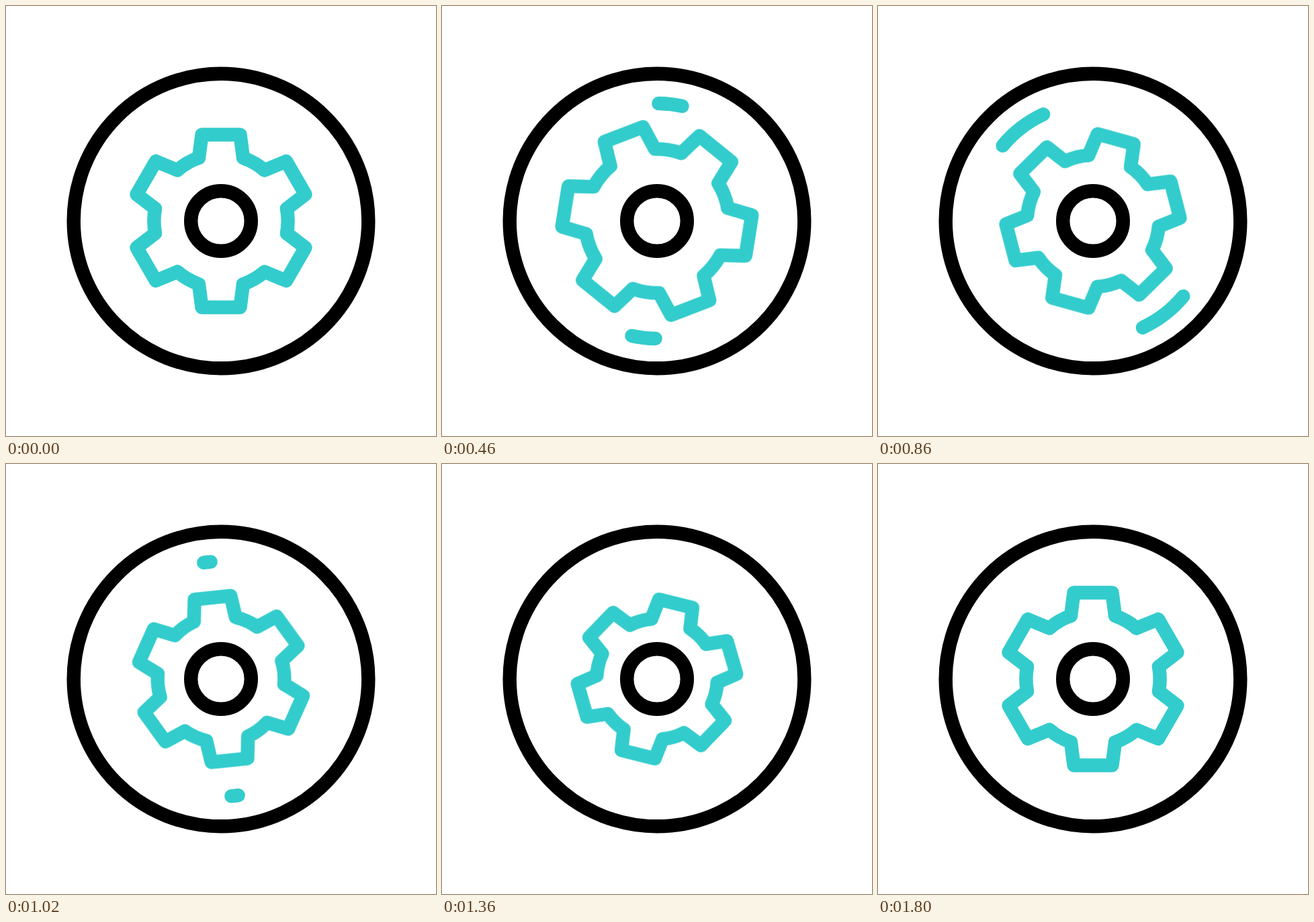
These frames come from a looping animation (640x640 px, 2420 ms). An HTML page without scripts:

```html
<!DOCTYPE html>
<html lang="en">
<head>
<meta charset="utf-8">
<title>Turning gear</title>
<style>
  @property --size { syntax: "<number>"; inherits: true; initial-value: 1; }
  @property --head { syntax: "<length>"; inherits: true; initial-value: 0px; }
  @property --tail { syntax: "<length>"; inherits: true; initial-value: 0px; }

  html, body { margin: 0; width: 100%; height: 100%; overflow: hidden; background: #fff; }
  svg { display: block; width: 100%; height: 100%; }

  .line { fill: none; stroke-width: 20.4px; stroke-linecap: round; stroke-linejoin: round; }
  .dark { stroke: #000; }
  .teal { stroke: #33cccc; }

  .gear {
    stroke-width: calc(20.4px / var(--size));
    transform: scale(var(--size));
    animation: pulse 2420ms cubic-bezier(.333, 0, .667, 1) infinite;
  }
  .spin { animation: spin 2420ms cubic-bezier(.068, 0, .927, 1) infinite; }

  .arcs {
    --swing: cubic-bezier(.7, 0, .3, 1);
    stroke-dasharray: calc(var(--head) - var(--tail)) 400px;
    stroke-dashoffset: calc(0px - var(--tail));
    animation: head 2420ms var(--swing) infinite, tail 2420ms var(--swing) infinite,
      show 2420ms step-end infinite;
  }

  /* 0, 200, 1400 and 1800 ms */
  @keyframes pulse {
    0% { --size: 1; }
    8.2645% { --size: 1.1; }
    57.8512% { --size: .9; }
    74.3802%, 100% { --size: 1; }
  }
  /* 0 to 1600 ms */
  @keyframes spin {
    0% { transform: rotate(0deg); }
    66.1157%, 100% { transform: rotate(360deg); }
  }
  /* 200 to 1200 ms */
  @keyframes head {
    0%, 8.2645% { --head: 0px; }
    49.5868%, 100% { --head: 180px; }
  }
  /* 400 to 1200 ms */
  @keyframes tail {
    0%, 16.5289% { --tail: 0px; }
    49.5868%, 100% { --tail: 180px; }
  }
  @keyframes show {
    0% { opacity: 0; }
    8.31% { opacity: 1; }
    49.58%, 100% { opacity: 0; }
  }
</style>
</head>
<body>
<svg viewBox="0 0 640 640">
  <defs>
    <path id="tooth" d="M-33,-94 L-28.5,-128.5 H28.5 L33,-94 A99.6,99.6 0 0 1 64.9,-75.6"/>
    <path id="arc" pathLength="180" d="M0,-175 A175,175 0 0 1 0,175"/>
  </defs>
  <g class="line" transform="translate(320 320)">
    <circle class="dark" r="219.3"/>
    <circle class="dark" r="44.8"/>
    <g class="teal arcs">
      <use href="#arc"/>
      <use href="#arc" transform="rotate(180)"/>
    </g>
    <g class="teal spin">
      <g class="gear">
        <use href="#tooth"/>
        <use href="#tooth" transform="rotate(60)"/>
        <use href="#tooth" transform="rotate(120)"/>
        <use href="#tooth" transform="rotate(180)"/>
        <use href="#tooth" transform="rotate(240)"/>
        <use href="#tooth" transform="rotate(300)"/>
      </g>
    </g>
  </g>
</svg>
</body>
</html>
```
